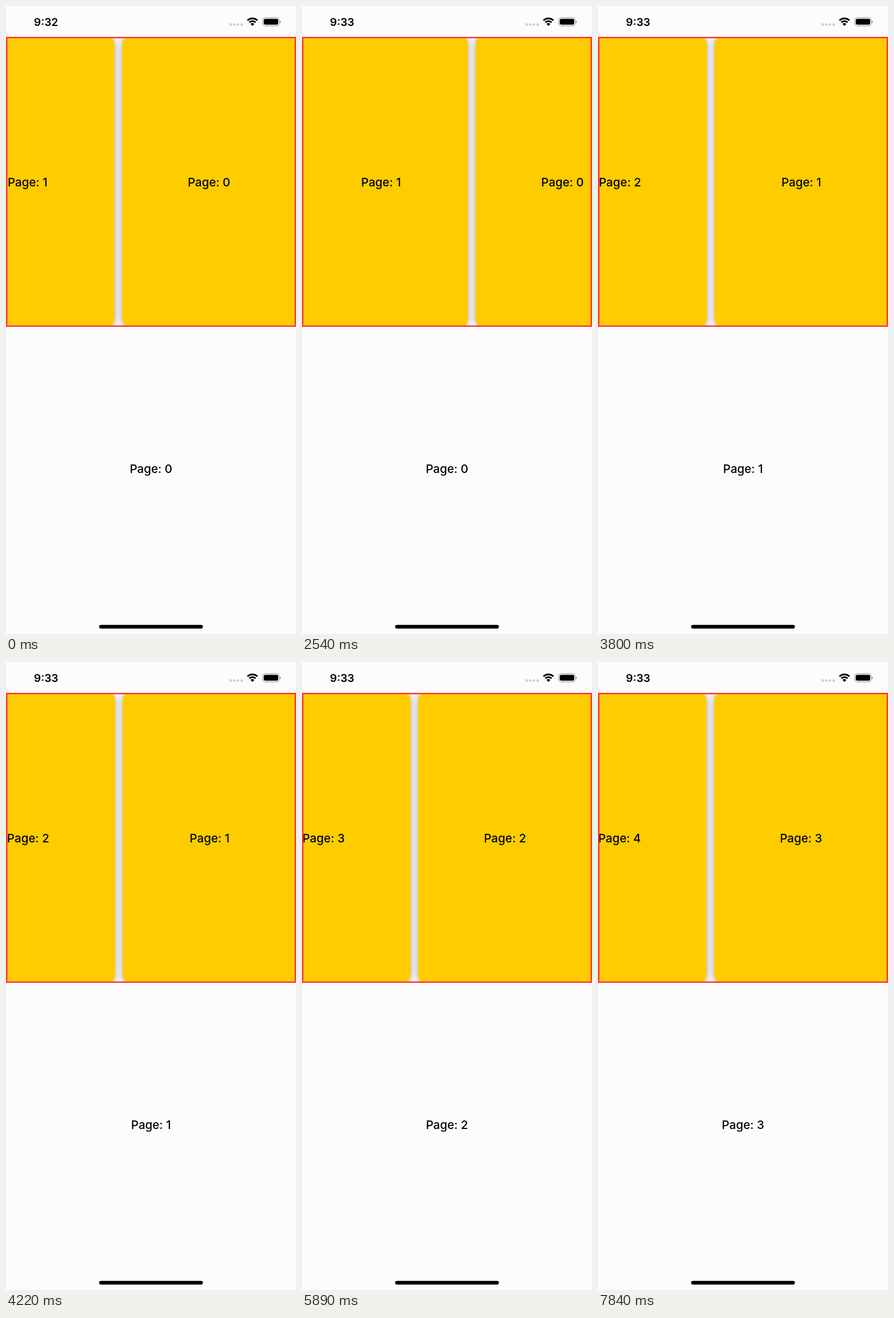
An HTML page with a canvas that plays this animation: 509x1100 px, repeating every 8 s.

```html
<!DOCTYPE html>
<html lang="en">
<head>
<meta charset="utf-8">
<title>Pager</title>
<style>
  html, body { margin: 0; width: 100%; height: 100%; overflow: hidden; background: #fcfcfe; }
  canvas { display: block; }
</style>
</head>
<body>
<canvas id="stage" width="509" height="1100"></canvas>
<script>
const g = document.getElementById('stage').getContext('2d');
const LOOP = 8000, STRIDE = 318.4, CARD = 305.4, REST = 203.6;
const FONT = '500 20.6px Inter, sans-serif';

// Drag from start to release, then spring to the next page or back.
const swipes = [
  { start: 2260, release: 2560, end: 3240, drag: 112, turn: 1 },
  { start: 3790, release: 3960, end: 4340, drag: 50, turn: 0 },
  { start: 5030, release: 5310, end: 5885, drag: 101, turn: 1 },
  { start: 6700, release: 7040, end: 7840, drag: 116.8, turn: 1 }
];

function offset(s, t) {
  const span = s.release - s.start;
  if (t < s.release) return s.drag * ((t - s.start) / span) ** 1.6;
  const goal = s.turn * STRIDE, dt = t - s.release;
  const w = 9 / (s.end - s.release), x = s.drag - goal, v = 1.6 * s.drag / span;
  return goal + (x + (v + w * x) * dt) * Math.exp(-w * dt);
}

function pose(t) {
  let page = 0;
  for (const s of swipes) {
    if (t < s.start) break;
    if (t < s.end) return { page, shift: offset(s, t), next: t >= s.release ? page + s.turn : page };
    page += s.turn;
  }
  return { page, shift: 0, next: page };
}

function text(str, x, y, font = FONT, align = 'center') {
  g.font = font;
  g.textAlign = align;
  g.fillStyle = '#000';
  g.fillText(str, x, y);
}

function box(x, y, w, h, r, color) {
  g.fillStyle = color;
  g.beginPath();
  g.roundRect(x, y, w, h, r);
  g.fill();
}

function statusBar(t) {
  text(t < 1460 ? '9:32' : '9:33', 49, 35, '600 19.2px Inter, sans-serif', 'left');
  for (let i = 0; i < 4; i++) box(392.3 + i * 6.4, 30.3, 4.4, 4.4, 2.2, '#cbcbcb');

  const a = -Math.PI / 2;
  g.strokeStyle = '#000';
  g.lineWidth = 2.9;
  for (const r of [13, 8.3]) {
    g.beginPath();
    g.arc(432.5, 34.8, r, a - 0.74, a + 0.74);
    g.stroke();
  }
  g.fillStyle = '#000';
  g.beginPath();
  g.moveTo(432.5, 35);
  g.arc(432.5, 34.8, 4.9, a - 0.74, a + 0.74);
  g.fill();

  g.strokeStyle = '#a6a6a6';
  g.lineWidth = 1.2;
  g.beginPath();
  g.roundRect(450.4, 20.4, 29.4, 14.4, 4.6);
  g.stroke();
  box(452.4, 22.4, 25.4, 10.4, 2.8, '#000');
  box(480.8, 25.2, 1.6, 5, [0, 1.6, 1.6, 0], '#a6a6a6');
}

function pager({ page, shift }) {
  g.save();
  g.beginPath();
  g.rect(0, 54, 509, 508);
  g.clip();
  for (let i = 0; i < 3; i++) {
    const x = REST - i * STRIDE + shift;
    g.shadowColor = 'rgba(0,0,0,.33)';
    g.shadowBlur = 13;
    box(x, 54, CARD, 508, 13, '#ffcc00');
    g.shadowColor = 'transparent';
    text('Page: ' + (page + i), x + CARD / 2, 316);
  }
  g.restore();
  g.strokeStyle = '#ff3b30';
  g.lineWidth = 2.6;
  g.strokeRect(1.3, 55.3, 506.4, 505.4);
}

// While a turn settles, the label keeps its old width and truncates.
function label({ page, next }) {
  g.font = FONT;
  const width = n => g.measureText('Page: ' + n).width;
  const room = width(page);
  const str = width(next) > room ? 'Page...' : 'Page: ' + next;
  text(str, 254.5 - room / 2, 818, FONT, 'left');
}

function draw(now) {
  const t = now % LOOP, p = pose(t);
  g.fillStyle = '#fcfcfe';
  g.fillRect(0, 0, 509, 1100);
  statusBar(t);
  pager(p);
  label(p);
  box(163.5, 1084, 182, 6.4, 3.2, '#000');
}

const begin = performance.now();
function tick() {
  draw(performance.now() - begin);
  requestAnimationFrame(tick);
}
tick();
</script>
</body>
</html>
```
